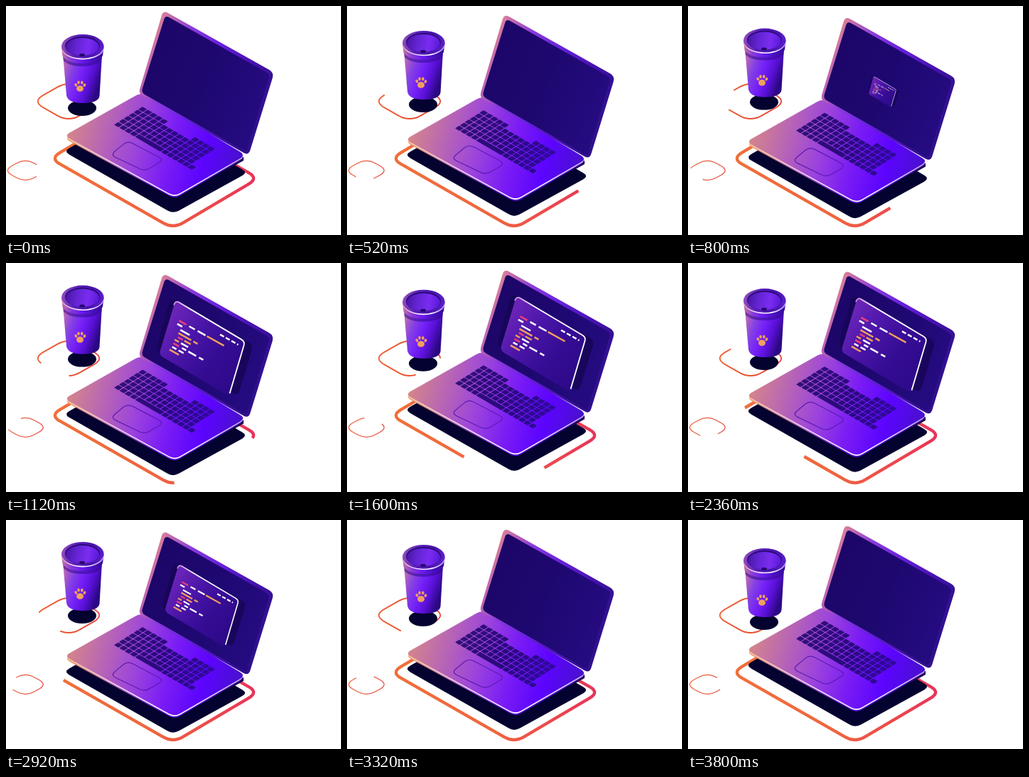
These frames come from a looping animation (471x323 px, 3.84 s). An HTML page with a canvas:

```html
<!DOCTYPE html>
<html lang="en">
<head>
<meta charset="utf-8">
<title>Laptop and cup</title>
<style>
  html, body { margin: 0; width: 100%; height: 100%; overflow: hidden; background: #fff; }
  canvas { display: block; width: 471px; height: 323px; }
</style>
</head>
<body>
<canvas id="stage" width="471" height="323"></canvas>
<script>
const ctx = document.getElementById('stage').getContext('2d');
const LOOP = 3840, HALF = LOOP / 2, STEP = 40;
const ORANGE = '#f0a05c', PINK = '#ee3f78', WHITE = '#fff', NAVY = '#04022f';

// Closed polygon with softened corners, as SVG path data.
function roundedPath(points, radius) {
  const n = points.length;
  const toward = (a, b) => {
    const k = Math.min(0.5, radius / Math.hypot(b[0] - a[0], b[1] - a[1]));
    return [a[0] + (b[0] - a[0]) * k, a[1] + (b[1] - a[1]) * k];
  };
  let d = 'M' + toward(points[0], points[1]);
  for (let i = 1; i <= n; i++) {
    const p = points[i % n];
    d += 'L' + toward(p, points[i - 1]) + 'Q' + p + ' ' + toward(p, points[(i + 1) % n]);
  }
  return d + 'Z';
}

const shape = (points, radius = 0) => new Path2D(roundedPath(points, radius));

function gradient(x0, y0, x1, y1, ...colors) {
  const g = ctx.createLinearGradient(x0, y0, x1, y1);
  colors.forEach((c, i) => g.addColorStop(i / (colors.length - 1), c));
  return g;
}

function fill(path, style) {
  ctx.fillStyle = style;
  ctx.fill(path);
}

function stroke(path, style, width) {
  ctx.strokeStyle = style;
  ctx.lineWidth = width;
  ctx.stroke(path);
}

function ellipse(x, y, rx, ry, style, tilt = 0) {
  const path = new Path2D();
  path.ellipse(x, y, rx, ry, tilt, 0, Math.PI * 2);
  fill(path, style);
}

function shifted(dy, draw) {
  ctx.save();
  ctx.translate(0, dy);
  draw();
  ctx.restore();
}

// Outline with one travelling gap; positions are fractions of the perimeter.
function makeTrack(points, radius, width, gap, colors) {
  const d = roundedPath(points, radius);
  const probe = document.createElementNS('http://www.w3.org/2000/svg', 'path');
  probe.setAttribute('d', d);
  const length = probe.getTotalLength(), path = new Path2D(d);
  const style = gradient(points[2][0], 0, points[0][0], 0, ...colors);
  return center => {
    ctx.save();
    ctx.setLineDash([length * (1 - gap), length * gap]);
    ctx.lineDashOffset = -(center + gap / 2) * length;
    stroke(path, style, width);
    ctx.restore();
  };
}

const rhombus = (x, y, w, h) => [[x + w, y], [x, y + h], [x - w, y], [x, y - h]];

const floorTrack = makeTrack([[355, 243], [235, 314], [62, 215], [181, 144.4]],
  16, 4.4, 0.196, ['#f0703a', '#ef653f', '#e8305a']);
const cupTrack = makeTrack(rhombus(88, 134.5, 51, 29), 18, 1.9, 0.21, ['#f0673a', '#e8502f', '#e64a44']);
const smallTrack = makeTrack(rhombus(27.3, 232, 31, 17), 14, 1.3, 0.22, ['#f0673a', '#e64a44']);

const laptop = {
  shadow: shape([[81, 205], [186, 145], [340, 235], [235, 293]], 9),
  base: shape([[82, 183], [190, 122], [337, 210.5], [237, 268.5]], 9),
  foot: shape([[296, 235], [334, 213], [334, 218], [318, 227]]),
  pad: shape([[147, 210], [171, 190], [222, 217], [195, 233]], 8),
  lid: shape([[221, 6], [377, 94], [341, 211], [186, 124]], 8),
  screen: shape([[224, 13], [371, 96.5], [338, 206], [190, 122]], 6),
  keys: keyboard()
};

function keyboard() {
  const path = new Path2D();
  const at = (u, v) => [192 + 103 * u - 41 * v, 142 + 60 * u + 26 * v];
  const key = (col, row, span = 1) => {
    const u0 = col / 14, u1 = (col + span - 0.14) / 14, v0 = row / 6, v1 = (row + 0.87) / 6;
    path.addPath(shape([at(u0, v0), at(u1, v0), at(u1, v1), at(u0, v1)], 1));
  };
  for (let row = 0; row < 6; row++) {
    for (let col = 0; col < 14; col++) {
      if (row === 0 && col > 4 && col < 10) continue;
      if (row === 5 && col >= 4 && col < 9) continue;
      key(col, row);
    }
  }
  key(4, 5, 5);
  key(14, 5);
  return path;
}

function drawLaptop(t) {
  fill(laptop.shadow, NAVY);
  fill(laptop.foot, '#170445');
  shifted(3.6, () => fill(laptop.base, gradient(84, 0, 340, 0, '#f2a26a', '#b065b0', '#5a14d0', '#4a08d8', '#2a0880')));
  shifted(1.8, () => fill(laptop.base, gradient(84, 0, 340, 0, '#f7c5a0', '#f0d8ff', '#fff', '#c9a4ff')));
  fill(laptop.base, gradient(92, 165, 326, 225, '#d4848c', '#b866b4', '#9c44dc', '#7a1cf4', '#5c04ff', '#4a10d0'));
  fill(laptop.keys, gradient(155, 150, 290, 220, '#35107a', '#2a0a7c', '#3009a0'));
  stroke(laptop.pad, '#5c1bb4', 1.2);
  fill(laptop.lid, gradient(200, 50, 370, 130, '#dc8296', '#8a3adc', '#6620dc', '#4a12b4', '#30108c'));
  fill(laptop.screen, gradient(200, 70, 360, 140, '#1d0668', '#1e0870', '#250b80'));
  const scale = windowScale(t);
  if (scale > 0) drawWindow(scale);
}

const ease = p => p < 0.5 ? 4 * p ** 3 : 1 - (2 - 2 * p) ** 3 / 2;
const progress = (t, from, to) => ease(Math.min(1, Math.max(0, (t - from) / (to - from))));
const windowScale = t => progress(t, 640, 1010) - progress(t, 2800, 3170);

const pane = {
  shadow: shape([[231, 41], [348, 107], [326, 179], [211, 114]], 8),
  body: shape([[238.5, 43.5], [337, 102], [314, 180], [215, 121]], 7),
  rim: new Path2D('M236 51Q238 44.5 243 47L331 99.5Q336 102.5 334.5 107.5L314.5 175.5')
};

// Each row: [offset, length, colour] dashes along the slope of the screen.
const CODE = [
  [[0, 10, PINK], [14, 8, WHITE], [26, 11, WHITE], [39, 24, ORANGE]],
  [[-1, 7, WHITE]],
  [[5, 13, WHITE]],
  [[4, 18, ORANGE], [25, 6, ORANGE]],
  [[5, 7, PINK], [14, 9, ORANGE]],
  [[2, 6, ORANGE], [11, 10, WHITE]],
  [[2, 8, PINK], [14, 6, WHITE], [23, 11, WHITE], [38, 6, WHITE]],
  [[2, 6, WHITE], [11, 7, WHITE]],
  [[0, 13, ORANGE]]
];

function drawWindow(scale) {
  ctx.save();
  ctx.translate(272, 113);
  ctx.scale(scale, scale);
  ctx.translate(-272, -113);
  fill(pane.shadow, 'rgba(22, 4, 82, 0.75)');
  fill(pane.body, gradient(228, 70, 325, 150, '#6a25b8', '#4a15a8', '#350c94', '#2e0a8a'));
  stroke(pane.rim, gradient(236, 0, 262, 0, '#c58ae0', WHITE), 1.8);
  const dash = (x, y, length, color) =>
    stroke(new Path2D(`M${x} ${y}l${length} ${length * 0.56}`), color, 2.5);
  CODE.forEach((row, i) => row.forEach(([offset, length, color]) =>
    dash(243.5 - 1.7 * i + offset, 73 + 5.1 * i + offset * 0.56, length, color)));
  for (let i = 0; i < 4; i++) dash(301 + 8 * i, 92.5 + 4.5 * i, i < 3 ? 5.5 : 1.5, WHITE);
  ctx.restore();
}

const cup = {
  body: new Path2D('M80 68L85 126Q87 137 108 137Q130 137 131.5 127L135 68Z'),
  band: new Path2D('M78 57L79.5 71Q86 81 108 81Q130 81 136 70L137.5 57Z'),
  lip: new Path2D('M79 62A29.5 16 0 0 0 137 61')
};

function drawCup() {
  ellipse(107, 144, 20, 11, NAVY);
  fill(cup.body, gradient(82, 82, 134, 100, '#b868b8', '#8440e4', '#7420f8', '#5a10d8', '#2c0884'));
  ctx.save();
  ctx.clip(cup.body);
  shifted(4, () => fill(cup.band, 'rgba(50, 8, 140, 0.55)'));
  ctx.restore();
  fill(cup.band, gradient(78, 60, 137, 66, '#c87aa0', '#8a3ad8', '#6a1af0', '#4a10c0', '#350a98'));
  ellipse(107.8, 57, 29.8, 17, gradient(78, 50, 138, 62, '#9450bc', '#5a20b8', '#4814a8', '#5c20cc'));
  stroke(cup.lip, gradient(78, 0, 138, 0, '#d493c0', '#f3e4ff', '#fff', '#b48cff'), 1.6);
  ellipse(107.5, 56.5, 24.5, 13.5, '#2a0a7c');
  ellipse(107.5, 57.5, 23.5, 12.5, gradient(84, 52, 131, 60, '#4a16a4', '#6424d4', '#7a2cf0', '#5a18d8'));
  ellipse(107, 69, 4, 2, '#24066c');
  ellipse(104, 116.5, 5, 4.3, ORANGE);
  ellipse(98.3, 111.3, 1.8, 2.4, ORANGE, -0.5);
  ellipse(102, 107.8, 1.8, 2.5, ORANGE);
  ellipse(106.8, 107.9, 1.8, 2.5, ORANGE);
  ellipse(110.4, 111.6, 1.8, 2.4, ORANGE, 0.5);
}

function render(now) {
  const t = Math.floor(now / STEP) * STEP % LOOP;
  const bob = 4.5 * (1 - Math.cos(2 * Math.PI * t / HALF));
  ctx.fillStyle = '#fff';
  ctx.fillRect(0, 0, 471, 323);
  floorTrack(t / LOOP - 0.205);
  cupTrack(-0.125 - t / HALF);
  smallTrack(0.92 + t / HALF);
  shifted(bob, () => drawLaptop(t));
  shifted(-bob, drawCup);
  requestAnimationFrame(render);
}

requestAnimationFrame(render);
</script>
</body>
</html>
```
